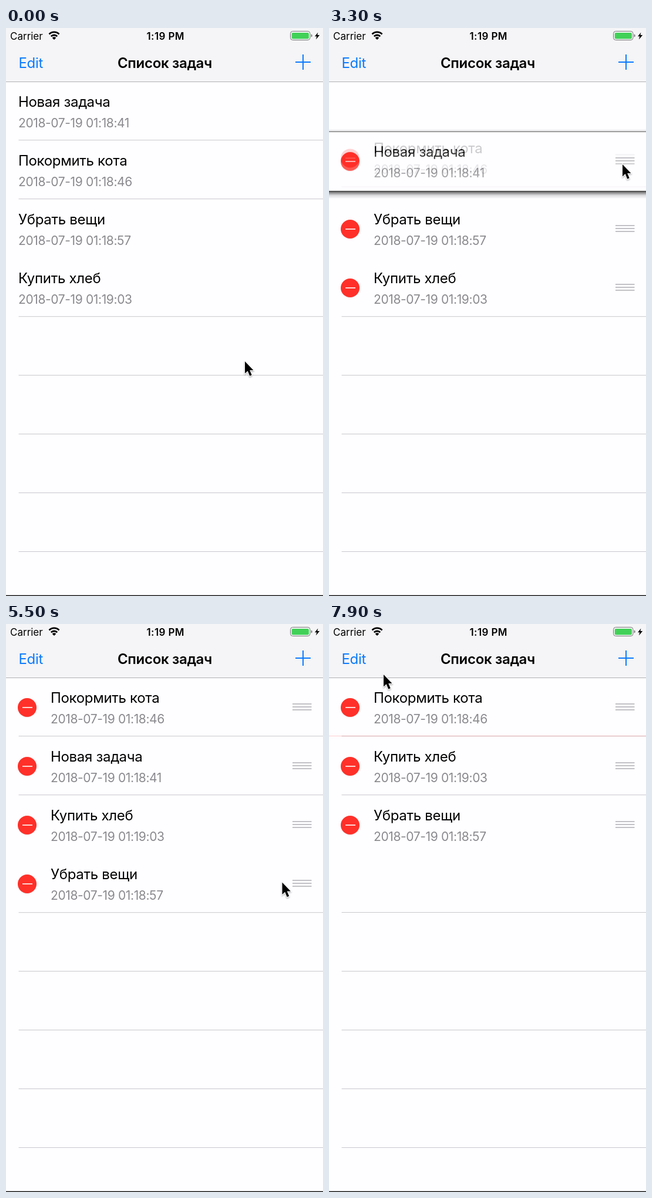
An HTML page for the animation above (8000 ms loop, 540x966 px).

```html
<!DOCTYPE html>
<html lang="ru">
<head>
<meta charset="utf-8">
<title>Список задач</title>
<style>
  html, body { margin: 0; width: 100%; height: 100%; overflow: hidden; background: #fefdff; }
  svg { display: block; width: 100vw; height: 100vh; font-family: Inter, "Open Sans", sans-serif; }
  .status { font-size: 17px; }
  .title { font-size: 24px; letter-spacing: -.013em; }
  .date { font-size: 21px; letter-spacing: -.018em; fill: #8a8a8e; }
  .bold { font-weight: 600; }
  .blue { fill: #0a7aff; }
  .rule { stroke: #c8c7cc; stroke-width: 1; }
</style>
</head>
<body>
<svg viewBox="0 0 540 966" preserveAspectRatio="none">
  <defs>
    <linearGradient id="below" x2="0" y2="1">
      <stop offset="0"/>
      <stop offset=".2" stop-opacity=".6"/>
      <stop offset=".55" stop-opacity=".17"/>
      <stop offset="1" stop-opacity="0"/>
    </linearGradient>
    <linearGradient id="above" x2="0" y2="1">
      <stop offset="0" stop-opacity="0"/>
      <stop offset="1" stop-opacity=".2"/>
    </linearGradient>
    <filter id="soft" x="-50%" y="-50%" width="200%" height="200%">
      <feDropShadow dx="0" dy="1.5" stdDeviation="1.3" flood-opacity=".35"/>
    </filter>
  </defs>

  <rect width="540" height="966" fill="#fefdff"/>
  <path id="emptyRules" class="rule"/>
  <path id="gapRule" class="rule" d="M21.5 391H540"/>
  <g id="list"></g>
  <rect id="remnant" y="190" width="540" height="1" fill="#ff3029"/>

  <rect width="540" height="91" fill="#f5f4f6"/>
  <path d="M0 91.5H540" stroke="#b1b0b4"/>
  <text class="status" x="7" y="19.5">Carrier</text>
  <g fill="none" stroke="#000" stroke-width="2.8">
    <path d="M73.5 10.5A12 12 0 0 1 90.5 10.5M76.8 14.2A7.3 7.3 0 0 1 87.2 14.2"/>
    <path d="M82 20L78.7 16.7A4.7 4.7 0 0 1 85.3 16.7Z" fill="#000" stroke="none"/>
  </g>
  <text class="status bold" x="271.7" y="19.5" text-anchor="middle" letter-spacing=".4">1:19 PM</text>
  <rect x="484.5" y="5.5" width="33.5" height="15" rx="4" fill="none" stroke="#77777a"/>
  <rect x="486.7" y="8" width="29.2" height="10.4" rx="2" fill="#42d158"/>
  <path d="M519.7 10.5q2 .4 2 2.5t-2 2.5z" fill="#77777a"/>
  <path d="M531.4 7.5L526 14.2H529.3L528 19.4L534.2 12H530.4Z"/>
  <text id="edit" class="title blue" x="21.5" y="68">Edit</text>
  <text class="title bold" x="270.5" y="68" text-anchor="middle">Список задач</text>
  <path d="M493 58H519M506 45V71" stroke="#0a7aff" stroke-width="2"/>
  <rect y="964.6" width="540" height="1.4" fill="#111"/>
  <path id="cursor" d="M0 0V20.5L4.7 16.2L8.2 24.8L11.7 23.3L8.2 15H14.4Z"
        stroke="#fff" stroke-width="1.8" paint-order="stroke" filter="url(#soft)"/>
</svg>

<script>
const LOOP = 8000, STEP = 100;
const WIDTH = 540, PITCH = 100, FIRST = 142;
const BUTTON = 110, SETTLE = 300;
const slot = i => FIRST + i * PITCH;
const $ = id => document.getElementById(id);
const list = $('list');

$('emptyRules').setAttribute('d',
  Array.from({ length: 5 }, (_, i) => `M21.5 ${490.5 + i * PITCH}H540`).join(''));

function makeRow(title, date) {
  const row = document.createElementNS('http://www.w3.org/2000/svg', 'g');
  row.innerHTML = `
    <g class="shadow">
      <rect y="-55" width="540" height="4" fill="url(#above)"/>
      <rect y="-51" width="540" height="1" fill-opacity=".75"/>
      <rect y="50" width="540" height="14" fill="url(#below)"/>
    </g>
    <rect y="-50" width="540" height="100" fill="#fefdff"/>
    <g class="content">
      <path class="rule" d="M21.5 48.7H540"/>
      <g class="labels">
        <text class="title" x="21" y="-8">${title}</text>
        <text class="date" x="21" y="27">${date}</text>
      </g>
      <g class="minus">
        <circle cx="36" cy="1" r="16" fill="#000" fill-opacity=".08"/>
        <circle cx="36" r="16" fill="#ff3029"/>
        <path d="M28 0H45" stroke="#fff" stroke-width="1.6"/>
      </g>
      <path class="grip" d="M488 -6H520.5M488 -1H520.5M488 4H520.5" stroke="#c2c1c5" stroke-width="2"/>
    </g>
    <g class="delete">
      <rect y="-51" width="540" height="100" fill="#ff3029"/>
      <text x="20" y="7.5" font-size="21.6" fill="#fff">Delete</text>
    </g>`;
  const part = name => row.querySelector('.' + name);
  list.append(row);
  return {
    row, shadow: part('shadow'), content: part('content'), rule: part('rule'),
    labels: part('labels'), minus: part('minus'), grip: part('grip'), del: part('delete')
  };
}

const fresh = makeRow('Новая задача', '2018-07-19 01:18:41');
const cat = makeRow('Покормить кота', '2018-07-19 01:18:46');
const bread = makeRow('Купить хлеб', '2018-07-19 01:19:03');
const tidy = makeRow('Убрать вещи', '2018-07-19 01:18:57');

const span = (t, start, length) => Math.max(0, Math.min(1, (t - start) / length));
const smooth = (t, start, length = SETTLE) => (1 - Math.cos(Math.PI * span(t, start, length))) / 2;
const easeOut = (t, start, length = SETTLE) => 1 - (1 - span(t, start, length)) ** 2;
const pulse = (t, on, off) => smooth(t, on, 150) * (1 - smooth(t, off));
const move = (x, y = 0) => `translate(${x} ${y})`;

// Each eased glide ends at (x, y); bow bends its path vertically.
const glides = [
  { start: 100, end: 400, x: 496, y: 50 },
  { start: 400, end: 700, x: 46, y: 58, bow: -45 },
  { start: 850, end: 1300, x: 64, y: 88 },
  { start: 1300, end: 1650, x: 46, y: 62 },
  { start: 1750, end: 2630, x: 500, y: 147, bow: 16 },
  { start: 3050, end: 3600, x: 500, y: 345 },
  { start: 3600, end: 3800, x: 500, y: 293 },
  { start: 3800, end: 4200, x: 502, y: 249 },
  { start: 4300, end: 5020, x: 502, y: 454 },
  { start: 5350, end: 6250, x: 32, y: 237 },
  { start: 6500, end: 7200, x: 486, y: 237 },
  { start: 7350, end: 7900, x: 93, y: 86 }
];

function pointerAt(t) {
  let x = 407, y = 567;
  for (const { start, end, x: toX, y: toY, bow = 0 } of glides) {
    const p = smooth(t, start, end - start);
    x += (toX - x) * p;
    y += (toY - y) * p + bow * Math.sin(Math.PI * p);
  }
  return [x, y];
}

// A row follows the pointer from grab to drop, then settles in its slot.
function dragged(t, grab, drop, home, goal) {
  if (t < grab) return home;
  const held = home + pointerAt(Math.min(t, drop))[1] - pointerAt(grab)[1];
  return held + (goal - held) * smooth(t, drop);
}

function placeRow(item, y, editing, lift = 0, slide = 0) {
  const { row, shadow, content, rule, labels, minus, grip, del } = item;
  const inThirdSlot = Math.abs(y - slot(2)) < .5;
  row.setAttribute('transform', move(0, y));
  row.setAttribute('opacity', 1 - .2 * Math.min(1, lift * 2));
  shadow.setAttribute('opacity', lift);
  rule.setAttribute('opacity', inThirdSlot || lift > 0 ? 0 : 1);
  content.setAttribute('transform', move(-slide));
  labels.setAttribute('transform', move(55 * editing));
  minus.setAttribute('transform', move(-55 * (1 - editing)));
  grip.setAttribute('transform', move(40 * (1 - editing)));
  grip.setAttribute('opacity', editing);
  del.setAttribute('transform', move(WIDTH - slide));
}

function draw(t) {
  const editing = smooth(t, 1750, 350);
  const collapse = smooth(t, 7350, 450);
  const slide = BUTTON * easeOut(t, 6300) + (WIDTH - BUTTON) * easeOut(t, 7300);

  // The first dragged row floats on top, later it lies under its neighbours.
  if (t < 4200) list.append(fresh.row);
  else list.prepend(fresh.row);

  const freshY = dragged(t, 3000, 3700, slot(0), slot(2)) - PITCH * smooth(t, 4680);
  const tidyHome = slot(2) - PITCH * smooth(t, 3430);
  const tidyY = dragged(t, 4300, 5200, tidyHome, slot(3)) - PITCH * collapse;
  const breadY = slot(3) - PITCH * (smooth(t, 4794) + collapse);

  placeRow(fresh, freshY, editing, pulse(t, 2950, 3700), slide);
  placeRow(cat, slot(1) - PITCH * smooth(t, 3210), editing);
  placeRow(bread, breadY, editing);
  placeRow(tidy, tidyY, editing, pulse(t, 4200, 5200));

  $('gapRule').setAttribute('opacity', t >= 3700 && t < 4000 ? 1 : 0);
  $('remnant').setAttribute('opacity', t >= 7800 ? .22 : 0);
  $('edit').setAttribute('opacity', 1 - .75 * pulse(t, 1450, 1700));
  $('cursor').setAttribute('transform', move(...pointerAt(t)));
}

const start = performance.now();
function tick() {
  const t = (performance.now() - start) % LOOP;
  draw(Math.floor(t / STEP) * STEP);
  requestAnimationFrame(tick);
}
tick();
</script>
</body>
</html>
```
